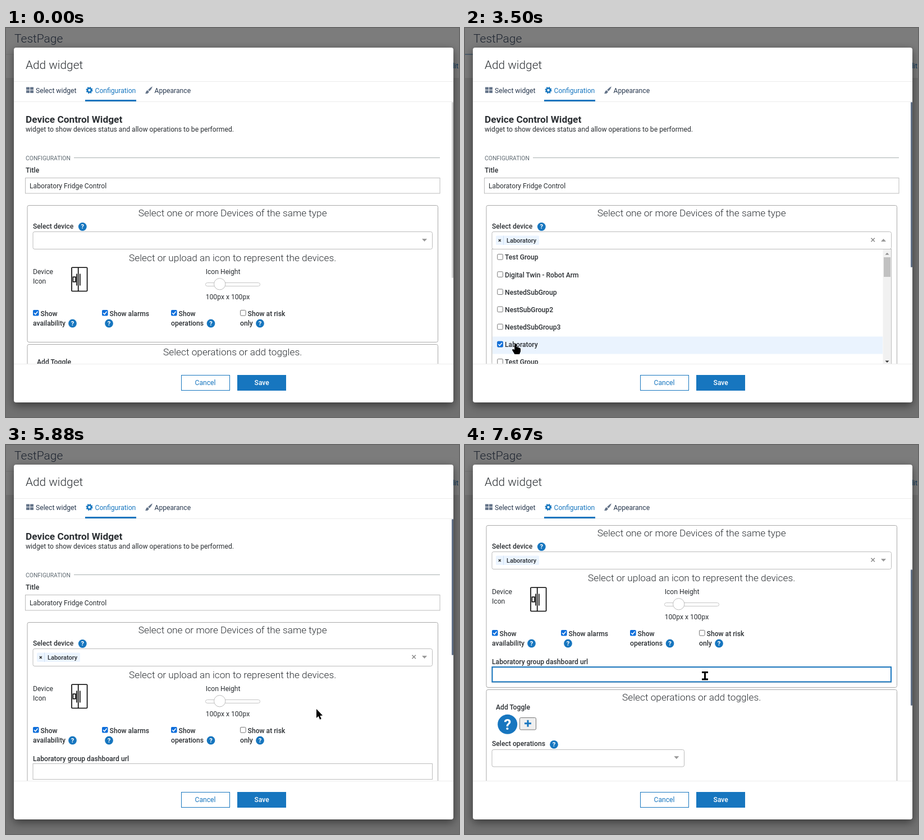
Animation, 807 px wide and 694 px high, one loop 8 s. Source, as an HTML page:

```html
<!DOCTYPE html>
<html lang="en">
<head>
<meta charset="utf-8">
<title>Add widget</title>
<style>
html, body { margin: 0; width: 100%; height: 100%; overflow: hidden; background: #6f6f6f; }
svg { display: block; width: 100vw; height: 100vh; font: 12.15px Roboto, sans-serif; }
text { fill: #2b2f33; white-space: pre; }
.medium { font-weight: 500; }
.light { font-weight: 300; font-size: 17.25px; text-anchor: middle; }
.heading { font-weight: 300; font-size: 20.8px; }
.box { fill: #fff; stroke: #bcbcbc; }
.panel { fill: none; stroke: #a9a9a9; }
.modal { filter: drop-shadow(0 5px 8px rgba(0, 0, 0, .5)); }
</style>
</head>
<body>
<svg id="stage" viewBox="0 0 807 694" preserveAspectRatio="none"></svg>
<script>
const BLUE = '#1776bf', SLATE = '#66758a';
const LOOP = 8000, STEP = 65;

const text = (x, y, s, attrs = '') => `<text x="${x}" y="${y}" ${attrs}>${s}</text>`;
const label = (x, y, s) => text(x, y, s, 'class="medium"');
const rect = (x, y, w, h, attrs = '') =>
  `<rect x="${x}" y="${y}" width="${w}" height="${h}" ${attrs}/>`;
const path = (d, attrs = '') => `<path d="${d}" ${attrs}/>`;
const group = (id, ...parts) => `<g id="${id}">${parts.join('')}</g>`;

const help = (x, y, r = 7.4) => `<circle cx="${x}" cy="${y}" r="${r}" fill="${BLUE}"/>` +
  text(x, y + r * .53, '?', `text-anchor="middle" font-weight="700" font-size="${r * 1.5}" style="fill:#fff"`);

const emptyCheck = (x, y) =>
  rect(x + .5, y + .5, 9.6, 9.6, 'rx="1.5" fill="#fff" stroke="#767676"');
const fullCheck = (x, y, id = '') => `<g id="${id}">` +
  rect(x, y, 10.6, 10.6, 'rx="1.8" fill="#0f6fdb"') +
  path(`M${x + 2.2} ${y + 5.4}l2.3 2.4 4-5`, 'fill="none" stroke="#fff" stroke-width="1.6"') + '</g>';

const caretDown = (x, y, id = '') => path(`M${x - 4.5} ${y - 2.5}h9l-4.5 5z`, `id="${id}" fill="#999"`);
const caretUp = (x, y, id = '') => path(`M${x - 4.5} ${y + 2.5}h9l-4.5-5z`, `id="${id}" fill="#999"`);
const cross = (x, y, r, color) =>
  path(`M${x - r} ${y - r}l${2 * r} ${2 * r}m0 ${-2 * r}l${-2 * r} ${2 * r}`, `stroke="${color}" stroke-width="1.5"`);

function backdrop() {
  return rect(0, 0, 807, 694, 'fill="#717171"') +
    rect(0, 0, 807, 89, 'fill="#7c7c7c"') +
    rect(0, 46.5, 14, 1, 'id="pageLine" fill="#707070"') +
    text(15, 25.5, 'TestPage', 'class="heading" style="font-size:21px;fill:#1d2430"') +
    text(806, 71.5, 'Edit', 'text-anchor="end" style="fill:#0c3557"') +
    rect(14, 35, 783, 633, 'rx="4" fill="#fff" class="modal"');
}

function header() {
  const grid = [[36, 105.5], [43, 105.5], [36, 111.2], [43, 111.2]]
    .map(([x, y]) => rect(x, y, 6, 4.7, `fill="${SLATE}"`)).join('');
  const gear = `<g fill="none" stroke="${BLUE}"><circle cx="148.5" cy="111" r="3.5" stroke-width="2.7"/>` +
    '<circle cx="148.5" cy="111" r="5.1" stroke-width="2" stroke-dasharray="2 2.005"/></g>';
  const brush = path('M260.8 104.2q-4 1.8-7.6 6.3l2.3 2.2q4.4-4 5.3-8.5z' +
    'M252.4 111.3q-2.7.2-3 2.8-.2 2-1.6 2.4 5 2 7-2.8z', `fill="${SLATE}"`);
  return text(35, 72.5, 'Add widget', 'class="heading"') +
    rect(14, 95, 783, 1, 'fill="#ececec"') + rect(14, 131, 783, 1, 'fill="#ececec"') +
    grid + gear + brush +
    text(53, 115.7, 'Select widget', 'style="fill:#2a3a50"') +
    text(158.5, 115.7, 'Configuration', `style="fill:${BLUE}"`) +
    text(264.5, 115.7, 'Appearance', 'style="fill:#2a3a50"') +
    rect(141, 128, 91, 3, `fill="${BLUE}"`);
}

function footer() {
  const center = 'text-anchor="middle"';
  return rect(14, 599, 783, 1, 'fill="#ececec"') +
    rect(312.5, 619.5, 86, 27, `fill="#fff" stroke="${BLUE}"`) +
    text(355, 637.2, 'Cancel', `${center} style="fill:${BLUE}"`) +
    rect(412, 619, 87, 28, `fill="${BLUE}"`) +
    text(455.7, 637.2, 'Save', `${center} class="medium" style="fill:#fff"`);
}

function fridge() {
  return '<g fill="none" stroke="#000" stroke-width="1.6">' +
    rect(117, 427.3, 27.6, 42.2, 'rx="1"') + rect(119.4, 444.2, 4.6, 8.6) +
    path('M128.7 427v43M126 438.500v21M131.800 438.500v21') + '</g>';
}

function options() {
  const columns = [
    ['Show', 'availability', 118.5], ['Show alarms', '', 183.5],
    ['Show', 'operations', 365], ['Show at risk', 'only', 452.500]
  ];
  return columns.map(([first, second, helpX], i) => {
    const x = 48 + 123 * i;
    return (i < 3 ? fullCheck : emptyCheck)(x, 503) +
      label(x + 13.600, 513.600, first) + label(x, 531, second) + help(helpX, 527);
  }).join('');
}

function deviceSelect() {
  return label(48, 357.5, 'Select device') + help(136.300, 354.500) +
    rect(48, 363.5, 711.5, 31, 'rx="3" class="box"') +
    caretDown(745.5, 378.500, 'closedCaret') + caretUp(745.5, 378.500, 'openCaret') +
    group('tag',
      rect(55, 370.500, 77, 16.500, 'rx="2" fill="#ebf4ff"'), rect(68, 370.500, 1, 16.500, 'fill="#cfe0f2"'),
      cross(61.800, 379, 2, '#333'),
      text(74, 382.800, 'Laboratory', 'class="medium" style="font-size:11px"'),
      cross(726.700, 378, 3.200, '#888'));
}

function dropdown() {
  const names = ['Test Group', 'Digital Twin - Robot Arm', 'NestedSubGroup', 'NestSubGroup2',
    'NestedSubGroup3', 'Laboratory', 'Test Group'];
  const rows = names.map((name, i) => {
    const y = 394.5 + 31.15 * i;
    return emptyCheck(57.300, y + 8.600) + (i === 5 ? fullCheck(57.300, y + 8.600, 'picked') : '') +
      label(71, y + 18.900, name);
  }).join('');
  return group('dropdown',
    rect(48, 394.5, 711.5, 240, 'class="box"'),
    rect(49, 550.500, 695, 31, 'id="pickedRow" fill="#eaf3fe"'), rows,
    rect(744.500, 395, 14.500, 205, 'fill="#f1f1f1"'),
    rect(746, 409, 12, 35, 'fill="#c1c1c1"'),
    path('M748.500 404.500h7l-3.500-3.500z', 'fill="#888"'),
    path('M748.500 593.500h7l-3.500 3.500z', 'fill="#333"'));
}

function toggles() {
  return group('toggles',
    rect(38, 564.5, 731.5, 300, 'rx="3" class="panel"'),
    text(403.700, 584, 'Select operations or add toggles.', 'class="light"'),
    label(55, 600.300, 'Add Toggle'), help(75.700, 626.300, 17.500),
    rect(97.500, 614.500, 29, 21.500, 'rx="2" fill="#efefef" stroke="#767676"'),
    path('M106 624.800h12M112 618.800v12', `stroke="${BLUE}" stroke-width="3"`),
    label(48, 665.300, 'Select operations'), help(158.500, 662.300),
    rect(48, 671.500, 342.5, 30.500, 'rx="3" class="box"'), caretDown(376.800, 685.700));
}

function content() {
  return '<clipPath id="view"><rect x="14" y="132" width="780" height="467"/></clipPath>' +
    '<g clip-path="url(#view)">' + group('content',
      text(35, 168.700, 'Device Control Widget', 'font-weight="700" font-size="17.3"'),
      text(35, 185.300, 'widget to show devices status and allow operations to be performed.'),
      text(35, 235.500, 'CONFIGURATION', 'font-size="10.4" style="fill:#5f6a72"'),
      rect(121, 231, 652, 1, 'fill="#a9b0b0"'),
      label(35, 258.300, 'Title'),
      rect(34.500, 267.5, 738.5, 27.5, 'class="box"'),
      text(42, 285.600, 'Laboratory Fridge Control'),
      rect(38, 316.5, 731.5, 244, 'id="panel" rx="3" class="panel"'),
      text(403.700, 335.500, 'Select one or more Devices of the same type', 'class="light"'),
      deviceSelect(),
      text(403.700, 416, 'Select or upload an icon to represent the devices.', 'class="light"'),
      text(48, 439, 'Device'), text(48, 456.300, 'Icon'), fridge(),
      text(355.700, 439, 'Icon Height'),
      rect(355.500, 454.5, 97, 6, 'rx="3" fill="#fff" stroke="#c4c4c4"'),
      '<circle cx="380.700" cy="456.800" r="10.200" class="box"/>',
      text(355.700, 484, '100px x 100px'),
      options(),
      group('urlField',
        label(48, 563.700, 'Laboratory group dashboard url'),
        rect(48, 568.5, 711.5, 28, 'class="box"'),
        rect(48.500, 569.200, 710.500, 26.300, `id="focusRing" fill="none" stroke="${BLUE}" stroke-width="2"`),
        rect(55, 575.300, 1, 15, 'id="caret" fill="#222"')),
      toggles(), dropdown()) + '</g>';
}

function pointer() {
  return group('pointer',
    '<circle id="click" r="10.300" cx="1" cy="0" fill="#f4e93f" opacity=".85"/>',
    path('M0 0V16L3.600 12.800 6.200 18.700 8.800 17.600 6.300 11.900 11 11.600Z', 'id="arrow"'),
    path('M-1.800 1.500Q0-1 1.700 1.500V6.300Q3.500 5.300 4.300 7 6.200 6.200 6.700 7.900 9 7.500 9 10V14L7 19H-1.500' +
      'Q-4-15 0 0M-1.800 1.500V10.500Q-5-8-6 10L-1.500 19H7V8H-1Z', 'id="handOld" visibility="hidden"'),
    path('M-1.800 1.500Q0-1 1.700 1.500V6.300Q3.500 5.300 4.300 7 6.200 6.200 6.700 7.900 9 7.500 9 10V14L7 19H-1.500' +
      'L-6 11.500Q-5.200 8.800-1.800 11Z', 'id="hand"'),
    path('M-5.500-7.500H5.500V-4.500H1.500V5H5.500V8H-5.500V5H-1.500V-4.500H-5.500Z', 'id="beam"')
  ).replace(/<path[^>]*id="handOld"[^>]*>/, '');
}

document.getElementById('stage').innerHTML = backdrop() + header() + content() + footer() +
  rect(794, 132, 3, 314, 'id="thumb" rx="1.500"') + pointer();

const el = id => document.getElementById(id);
const show = (id, on) => el(id).setAttribute('visibility', on ? 'inherit' : 'hidden');

// Keys are [time, value, ...]; values are linear in between.
const pointerKeys = [
  [780, 330, 676], [975, 262, 510], [1170, 217, 393], [1365, 196, 376], [1560, 191, 372],
  [2430, 191, 372], [2625, 140, 420], [2820, 70, 525], [3015, 90, 563],
  [3780, 90, 563], [3975, 240, 541], [4235, 620, 481], [4430, 755, 460], [4560, 778, 457],
  [5090, 778, 457], [5285, 690, 488], [5480, 500, 520], [5610, 416, 525], [5740, 475, 500], [5870, 553, 471],
  [5940, 555, 472], [6135, 568.5, 477], [6265, 568.5, 477], [6500, 490, 450], [6720, 428, 419],
  [6800, 428, 417], [7000, 427.5, 411.5]
];
const scrollKeys = [[5875, 0], [5940, 14], [6005, 62], [6070, 108], [6135, 138], [6200, 156], [6265, 166.7], [6330, 173]];
const motionStarts = [0, 780, 2430, 3780, 5090, 5940];
const clicks = [[1830, 1960], [3240, 3370], [4760, 4890], [7200, 7340]];

function sample(keys, t) {
  const next = keys.findIndex(k => k[0] > t);
  if (next === 0) return keys[0].slice(1);
  if (next < 0) return keys[keys.length - 1].slice(1);
  const a = keys[next - 1], b = keys[next], p = (t - a[0]) / (b[0] - a[0]);
  return a.slice(1).map((v, i) => v + (b[i + 1] - v) * p);
}

function draw(t) {
  const start = motionStarts.filter(s => s <= t).pop();
  const stepped = start + Math.floor((t - start) / STEP) * STEP;
  const [x, y] = sample(pointerKeys, stepped);
  const scroll = t < 5940 ? 0 : sample(scrollKeys, stepped)[0];
  const open = t >= 1830 && t < 4760;
  const picked = t >= 3300, selected = t >= 3370;
  const shift = selected ? 45 : 0;

  el('content').setAttribute('transform', `translate(0 ${-scroll})`);
  el('toggles').setAttribute('transform', `translate(0 ${shift})`);
  el('panel').setAttribute('height', 244 + shift);
  show('dropdown', open);
  show('openCaret', open);
  show('closedCaret', !open);
  show('picked', picked);
  show('pickedRow', picked);
  show('tag', selected);
  show('urlField', selected);
  show('focusRing', t >= 7200);
  show('caret', t >= 7200 && t < 7670);

  const thumb = el('thumb');
  thumb.setAttribute('y', 132 + scroll * 467 / 897);
  thumb.setAttribute('height', t < 3370 ? 314 : t < 3850 ? 295 : 243);
  thumb.setAttribute('fill', t < 845 ? '#cfcfcf' : '#5f6e86');
  el('pageLine').setAttribute('fill', t >= 3370 && t < 3850 ? '#20405c' : '#707070');

  const beam = t >= 6005;
  const hand = open && !beam && y > 396 && x < 744;
  el('pointer').setAttribute('transform', `translate(${x} ${y})`);
  show('pointer', t >= 780);
  show('arrow', !hand && !beam);
  show('hand', hand);
  show('beam', beam);
  show('click', clicks.some(([from, to]) => t >= from && t < to));
}

function tick() {
  draw(performance.now() % LOOP);
  requestAnimationFrame(tick);
}
tick();
</script>
</body>
</html>
```
